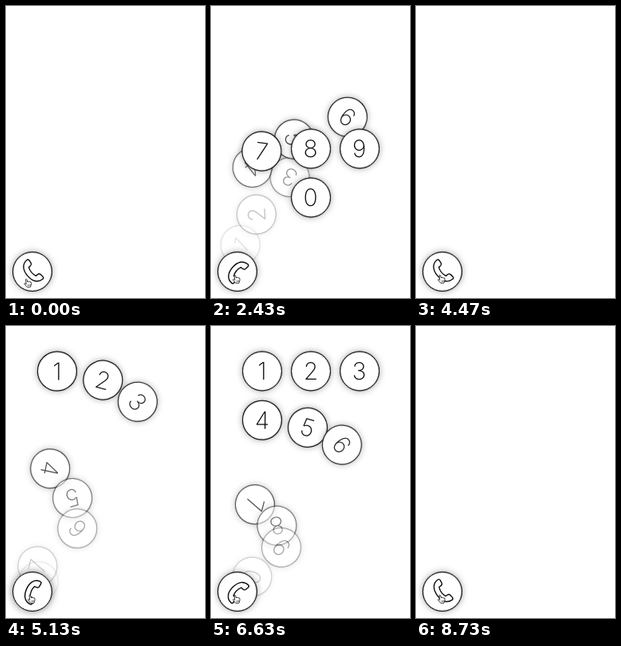
These frames come from a looping animation (249x365 px, 8760 ms). An HTML page:

```html
<!DOCTYPE html>
<html lang="en">
<head>
<meta charset="utf-8">
<title>Dial pad</title>
<style>
  html, body { margin: 0; width: 100%; height: 100%; overflow: hidden; background: #fff; }
  .key {
    position: absolute; left: 7.5px; top: 307px; width: 50px; height: 50px;
    box-sizing: border-box; border: 1px solid #0c0c0c; border-radius: 50%;
    background: #fff;
    box-shadow: inset 0 0 1px #000, 0 0 1px rgba(0, 0, 0, .5), 0 0 9px rgba(0, 0, 0, .34);
    font: 250 30px/49px Inter, Roboto, "Liberation Sans", sans-serif;
    color: #0c0c0c; text-align: center;
  }
  .digit { opacity: 0; }
  .pressed { box-shadow: inset 0 0 1px #000, 0 0 10px rgba(0, 0, 0, .5); }
  svg { position: absolute; overflow: visible; }
  #handset { left: 24px; top: 24px; width: 1px; height: 1px; }
  #hand { left: 0; top: 0; width: 10px; height: 11px; }
</style>
</head>
<body>
<div id="pad"></div>
<div id="call" class="key">
  <svg id="handset">
    <path id="phone" fill="#fff" stroke="#0c0c0c" stroke-width="1.4" stroke-linejoin="round"
      d="M-15.5 4C-15.5-4-9-8 0-8S15.5-4 15.5 4Q15.5 6 13 6L9 5.5Q7 5 7 2.5V0Q0-3-7 0V2.5Q-7 5-9 5.5L-13 6Q-15.5 6-15.5 4Z"/>
  </svg>
</div>
<svg id="hand" viewBox="0 0 10 11">
  <path fill="#fff" stroke="#222" stroke-width=".9" stroke-linejoin="round"
    d="M2 .8Q3-.2 3.7 1L4.5 4 5 3.2 6 3.7 6.6 3.3 7.6 4 8.5 3.8Q9.3 5 9 7L8 10.3H3.8L.6 6.6Q.3 5.5 1.4 5.6L2.8 6.6Z"/>
  <path fill="none" stroke="#333" stroke-width=".6" d="M5 7v2M6.4 7v2M7.6 7v1.6"/>
</svg>
<script>
  const LOOP = 8760, OPEN = 1360, CLOSE = 1220, PRESS = 130;
  const STAGGER = 0.114, TURN = 130;
  // Each click restarts the whole run from its first pose.
  const clicks = [170, 1965, 3368, 4000, 4470, 5210, 5744, 7555];

  const pad = document.getElementById('pad');
  const call = document.getElementById('call');
  const phone = document.getElementById('phone');
  const hand = document.getElementById('hand');

  const clamp = x => Math.min(1, Math.max(0, x));
  const swing = x => (1 - Math.cos(Math.PI * clamp(x))) / 2;

  const digits = [1, 2, 3, 4, 5, 6, 7, 8, 9, 0].map((label, i) => {
    const el = document.createElement('div');
    el.className = 'key digit';
    el.textContent = label;
    pad.append(el);
    const col = label ? i % 3 : 1;
    return { el, x: 31 + 61 * col, y: -275.6 + 61 * Math.floor(i / 3) };
  });

  function draw(t) {
    const last = clicks.filter(c => c <= t).length - 1;
    const opening = last % 2 === 0;
    const total = opening ? OPEN : CLOSE;
    const span = total / (1 + 9 * STAGGER);
    const age = last < 0 ? total : t - clicks[last];
    const pose = x => opening ? x : 1 - x;

    digits.forEach(({ el, x, y }, i) => {
      const p = pose(swing(age / span - i * STAGGER));
      el.style.opacity = p;
      el.style.transform = `translate(${x * p}px, ${y * p}px) rotate(${360 * (1 - p)}deg)`;
    });

    phone.setAttribute('transform', `rotate(${-TURN * (1 - pose(clamp(age / total)))})`);
    call.classList.toggle('pressed', clicks.some(c => t >= c - PRESS && t < c));

    const slide = clamp((t - 20) / 120);
    hand.style.transform = `translate(${22.5 + 4.5 * slide}px, ${341 - 5 * slide}px)`;
  }

  const start = performance.now();
  function tick() {
    draw((performance.now() - start) % LOOP);
    requestAnimationFrame(tick);
  }
  tick();
</script>
</body>
</html>
```
